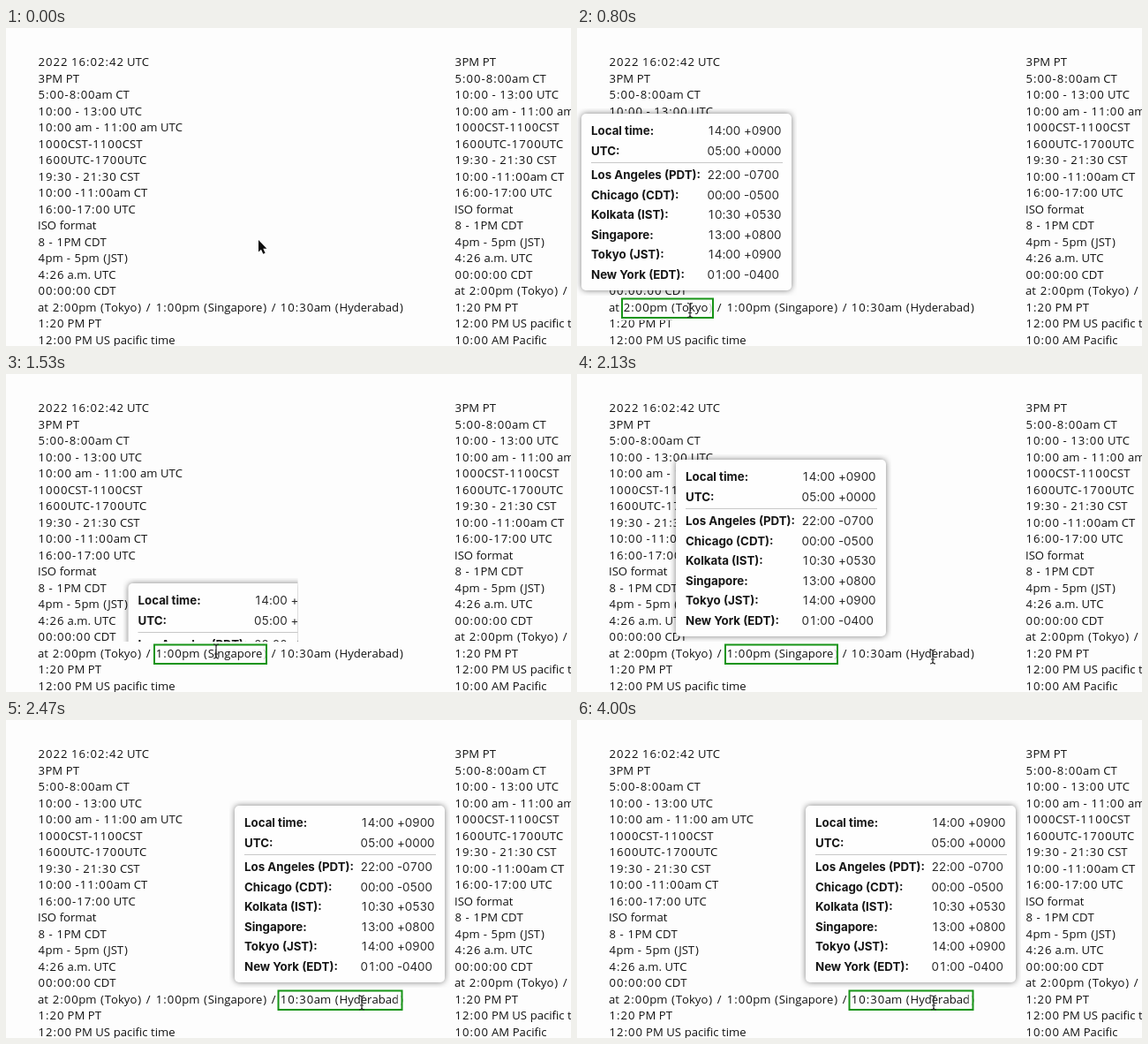
These frames come from a looping animation (640x360 px, 4.39 s). An HTML page with a canvas:

```html
<!DOCTYPE html>
<html lang="en">
<head>
<meta charset="utf-8">
<title>Time zone popup</title>
<style>
html, body { margin: 0; width: 100%; height: 100%; overflow: hidden; background: #fdfdfd; }
canvas { display: block; }
</style>
</head>
<body>
<canvas id="stage" width="640" height="360"></canvas>
<script>
const ctx = document.getElementById('stage').getContext('2d');
const LOOP = 4390, FPS = 15;
const PAGE = '#fdfdfd', INK = '#121212', GREEN = '#169416';

const rows = [
  '2022 16:02:42 UTC', '3PM PT', '5:00-8:00am CT', '10:00 - 13:00 UTC',
  '10:00 am - 11:00 am UTC', '1000CST-1100CST', '1600UTC-1700UTC',
  '19:30 - 21:30 CST', '10:00 -11:00am CT', '16:00-17:00 UTC', 'ISO format',
  '8 - 1PM CDT', '4pm - 5pm (JST)', '4:26 a.m. UTC', '00:00:00 CDT',
  [[0, 'at'], [16.3, '2:00pm (Tokyo) /'], [133.2, '1:00pm (Singapore) /'], [274.2, '10:30am (Hyderabad)']],
  '1:20 PM PT', '12:00 PM US pacific time', '10:00 AM Pacific'
];

const zones = [
  ['Local time:', '14:00 +0900', 121], ['UTC:', '05:00 +0000', 143.5],
  ['Los Angeles (PDT):', '22:00 -0700', 171], ['Chicago (CDT):', '00:00 -0500', 193.5],
  ['Kolkata (IST):', '10:30 +0530', 216], ['Singapore:', '13:00 +0800', 238.5],
  ['Tokyo (JST):', '14:00 +0900', 261], ['New York (EDT):', '01:00 -0400', 283.5]
];

// Highlighted dates: box edges, popup position, and the ticks when each part shows.
const dates = [
  { left: 50, right: 155, popup: 5, from: 9, part: 10, full: 11, to: 23 },
  { left: 167, right: 296, popup: 112, from: 23, part: 23, full: 24, to: 35 },
  { left: 307.5, right: 449.5, popup: 259, from: 35, part: 36, full: 37, to: 99 }
];

// Pointer path: tick, x, y.
const path = [
  [0, 286, 240], [1, 268, 249], [3, 182, 292], [5, 128, 319.5], [12, 128, 319.5],
  [16, 68, 319], [17, 64, 319], [18, 148, 318], [19, 238, 314], [27, 238, 314],
  [29, 175, 317], [32, 403, 320], [42, 403, 320], [43, 405, 320], [44, 404, 320],
  [49, 404, 320], [51, 314, 318], [53, 404, 320]
];

function tracking(run) {
  if (/[\d:-]/.test(run)) return 1;
  if (/[()\/]/.test(run)) return 1.9;
  return run[0] === ' ' ? 0.2 : 0;
}

// Each glyph sits in the middle of its tracked cell.
function spacedText(text, x, y) {
  for (const run of text.match(/[A-Za-z.]+|[\d:-]+| +|[()\/]+/g)) {
    const gap = tracking(run);
    ctx.letterSpacing = gap + 'px';
    ctx.fillText(run, x + gap / 2, y);
    x += ctx.measureText(run).width;
  }
  ctx.letterSpacing = '0px';
}

function tabularText(text, x, y) {
  const cell = ctx.measureText('0').width;
  for (const ch of text) {
    const width = ctx.measureText(ch).width;
    const advance = /\d/.test(ch) ? cell : width;
    ctx.fillText(ch, x + (advance - width) / 2, y);
    x += advance;
  }
}

function column(x, first) {
  for (let i = 0; i < 18; i++) {
    const row = rows[i + first], y = 43 + i * 18.53;
    const parts = typeof row === 'string' ? [[0, row]] : row;
    for (const [dx, text] of parts) spacedText(text, x + dx, y);
  }
}

function page() {
  ctx.fillStyle = PAGE;
  ctx.fillRect(0, 0, 640, 360);
  ctx.fillStyle = INK;
  ctx.font = '13.1px "Open Sans", sans-serif';
  ctx.fontKerning = 'none';
  column(36, 0);
  column(508, 1);
  ctx.fontKerning = 'auto';
}

function highlight({ left, right }) {
  const width = right - left;
  ctx.fillStyle = 'rgba(253,253,253,.75)';
  ctx.fillRect(right - 6, 307, 5, 20);
  ctx.fillRect(left, 328, width, 3);
  ctx.strokeStyle = GREEN;
  ctx.lineWidth = 2;
  ctx.strokeRect(left + 1, 306.5, width - 2, 21.5);
}

function popup(x, y, clip) {
  ctx.save();
  ctx.beginPath();
  ctx.rect(...clip);
  ctx.clip();
  ctx.translate(x, y);

  ctx.save();
  ctx.shadowColor = 'rgba(0,0,0,.5)';
  ctx.shadowBlur = 7;
  ctx.fillStyle = '#fefefe';
  ctx.beginPath();
  ctx.roundRect(0, 0, 238, 200, 5);
  ctx.fill();
  ctx.restore();

  ctx.fillStyle = '#c8c8c8';
  ctx.fillRect(11, 55, 217, 1);
  for (const [label, time, base] of zones) {
    ctx.fillStyle = '#161616';
    ctx.font = '700 13.3px Inter, sans-serif';
    ctx.fillText(label, 11, base - 97);
    ctx.fillStyle = '#2c2c2c';
    ctx.font = '13.4px Inter, sans-serif';
    tabularText(time, 142.5, base - 97);
  }
  ctx.restore();
}

function showDate(date, tick) {
  if (tick < date.from || tick >= date.to) return;
  highlight(date);
  if (tick >= date.full) {
    popup(date.popup, 97, [date.popup - 6, 91, 250, 212]);
  } else if (tick >= date.part) {
    const x = (date.left + date.right) / 2 - 99;
    popup(x + 6, 237, [x, 231, 198, 72]);
  }
}

function pointerAt(tick) {
  const i = path.findIndex(p => p[0] > tick);
  if (i < 0) return path[path.length - 1].slice(1);
  const [t0, x0, y0] = path[i - 1], [t1, x1, y1] = path[i];
  const k = (tick - t0) / (t1 - t0);
  return [x0 + (x1 - x0) * k, y0 + (y1 - y0) * k];
}

function arrow() {
  ctx.beginPath();
  for (const [x, y] of [[0, 0], [0, 13.5], [3, 10.7], [5.3, 15.7], [7.6, 14.7], [5.3, 9.8], [9.4, 9.8]]) ctx.lineTo(x, y);
  ctx.closePath();
  ctx.lineJoin = 'round';
  ctx.lineWidth = 2;
  ctx.strokeStyle = '#fff';
  ctx.stroke();
  ctx.fillStyle = '#0c0c0c';
  ctx.fill();
}

function beam() {
  ctx.beginPath();
  for (const s of [-1, 1]) {
    ctx.moveTo(-3, 8 * s);
    ctx.quadraticCurveTo(0, 8 * s, 0, 5.5 * s);
    ctx.quadraticCurveTo(0, 8 * s, 3, 8 * s);
  }
  ctx.moveTo(0, -6);
  ctx.lineTo(0, 6);
  ctx.moveTo(-2, 3);
  ctx.lineTo(2, 3);
  ctx.lineWidth = 1.2;
  ctx.strokeStyle = '#2c2c2c';
  ctx.stroke();
}

function draw(now) {
  const tick = Math.floor((now % LOOP + 4) * FPS / 1000);
  page();
  for (const date of dates) showDate(date, tick);
  const [x, y] = pointerAt(tick);
  ctx.save();
  ctx.translate(x, y);
  if (y > 307) beam(); else arrow();
  ctx.restore();
}

let start;
function loop(now) {
  start ??= now;
  draw(now - start);
  requestAnimationFrame(loop);
}
draw(0);
requestAnimationFrame(loop);
</script>
</body>
</html>
```
